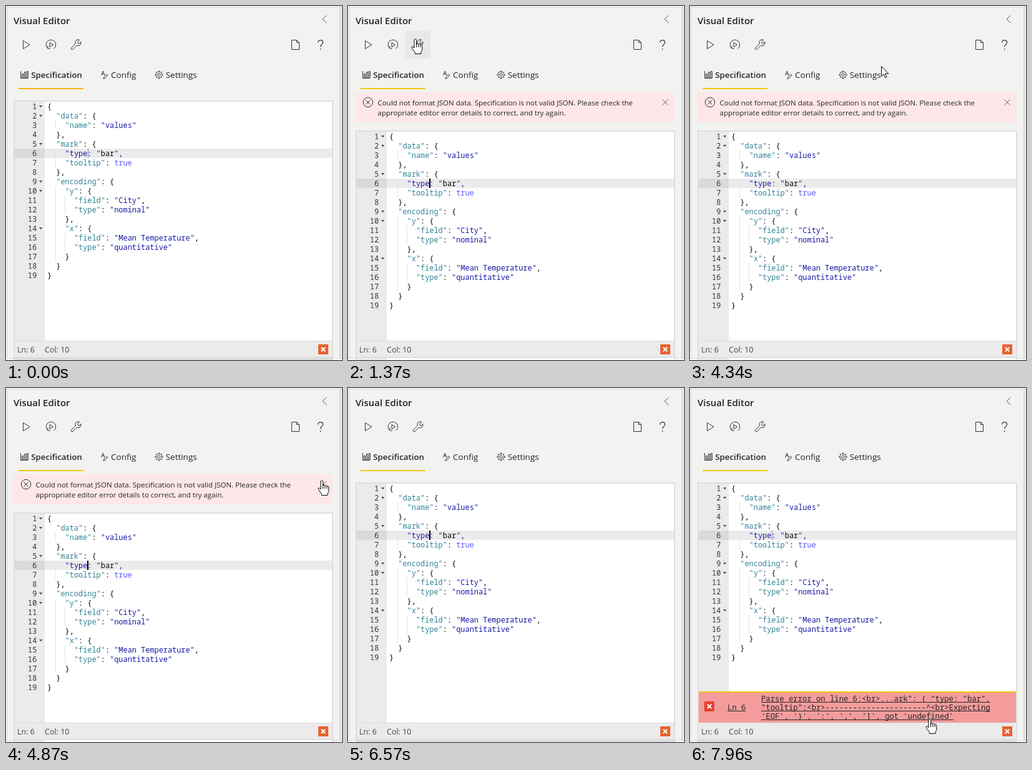
Write an HTML page that moves like this. It is 538x566 px and loops after 8000 ms.

```html
<!DOCTYPE html>
<html lang="en">
<head>
<meta charset="utf-8">
<title>Visual Editor</title>
<style>
html, body { margin: 0; width: 100%; height: 100%; overflow: hidden; background: #fff; }
svg { display: block; }
text { white-space: pre; font-family: "Open Sans", "Noto Sans", sans-serif; fill: #252423; }
.code { font-family: "Noto Sans Mono", "DejaVu Sans Mono", monospace; font-size: 11.917px; fill: #080808; }
.num { fill: #333; text-anchor: end; }
.key { fill: #318495; }
.str { fill: #1a1aa6; }
.bool { fill: #585cf6; }
.log { font-size: 12.22px; fill: #252423; }
.icon { fill: none; stroke: #333; stroke-width: 1; }
.tab { font-size: 13.5px; }
.note { font-size: 11.53px; }
.status { font-size: 12.5px; fill: #444; }
.cursor { fill: #fff; stroke: #000; stroke-linejoin: round; }
</style>
</head>
<body>
<svg id="stage" width="538" height="566" viewBox="0 0 538 566"></svg>
<script>
const source = `{
  "data": {
    "name": "values"
  },
  "mark": {
    "type: "bar",
    "tooltip": true
  },
  "encoding": {
    "y": {
      "field": "City",
      "type": "nominal"
    },
    "x": {
      "field": "Mean Temperature",
      "type": "quantitative"
    }
  }
}`.split("\n");
const log = [
  'Parse error on line 6:<br>...ark": { "type: "bar",',
  '"tooltip":<br>' + "-".repeat(22) + "^<br>Expecting",
  "'EOF', '}', ':', ',', ']', got 'undefined'"
];
const CHAR = 7.15, LEFT = 66;

const escape = s => s.replace(/&/g, "&amp;").replace(/</g, "&lt;");
const rect = (x, y, w, h, fill, more = "") =>
  `<rect x="${x}" y="${y}" width="${w}" height="${h}" fill="${fill}" ${more}/>`;
const text = (x, y, cls, s, more = "") =>
  `<text x="${x}" y="${y}" class="${cls}" ${more}>${s}</text>`;
const icon = (d, more = "") => `<path class="icon" d="${d}" ${more}/>`;
const cross = (x, y, r, more) =>
  icon(`M${x - r} ${y - r}l${2 * r} ${2 * r}m0 ${-2 * r}l${-2 * r} ${2 * r}`, more);
const circle = (x, y, r) => `<circle class="icon" cx="${x}" cy="${y}" r="${r}"/>`;
const group = (id, body) => `<g id="${id}">${body}</g>`;
const errorMark = (x, y, fill) =>
  rect(x, y, 16, 16, fill) + cross(x + 8, y + 8, 3.2, 'style="stroke:#fff;stroke-width:2"');

const highlight = line => line.replace(/"[^"]*(?:"|$)(:?)|true/g, (m, colon = "") => {
  const word = colon ? m.slice(0, -1) : m;
  const cls = m === "true" ? "bool" : colon ? "key" : "str";
  return `<tspan class="${cls}">${word}</tspan>${colon}`;
});

function codeLine(line, i) {
  const y = 153 + 15 * i, depth = line.search(/\S/) / 2;
  let out = text(49.3, y + 11.8, "code num", i + 1);
  if (line.endsWith("{")) out += `<path d="M53 ${y + 6}h5.4l-2.7 3.4z" fill="#555"/>`;
  for (let k = 1; k < depth; k++)
    out += rect(Math.round(LEFT + k * 2 * CHAR) - 1, y, 1, 15, "#e2e2e2");
  return out + text(LEFT + depth * 2 * CHAR, y + 11.8, "code", highlight(line.trim()));
}

const gearTeeth = Array.from({ length: 8 }, (_, i) => {
  const c = Math.cos(i * Math.PI / 4), s = Math.sin(i * Math.PI / 4);
  return `M${245 + 5 * c} ${110 + 5 * s}L${245 + 7 * c} ${110 + 7 * s}`;
}).join("");

const wrench = "M104.8 66.8L111.3 60.3Q109.8 55.5 114 54Q116 53.3 117.8 54.2L114.6 57.4" +
  "L115.3 59.6 117.5 60.2 119.8 57.2Q120.8 60.5 118.3 62.8Q116 64.5 113.5 63.2" +
  "L107.2 69.3Q105.7 70.2 104.6 69.1T104.8 66.8Z";

const toolbar =
  text(12, 29, "", "Visual Editor", 'font-size="15" font-weight="600"') +
  icon("M513.3 15L507 21 513.3 27", 'style="stroke:#555"') +
  icon("M27.5 55.5V68.5L38 62Z") +
  icon("M66.5 67.5A7.8 7.8 0 1 1 76.5 68.3M66.8 63.8V68H71M70 58.5V65.5L75.5 62Z") +
  icon(wrench) +
  icon("M457.5 54.5H465.5L469.5 58.5V69.5H457.5ZM465.5 54.5V58.5H469.5") +
  icon("M499.7 58.5Q499.7 54.6 503.6 54.6T507.5 58.2Q507.5 60.3 505.5 61.8T503.6 65.2M503.6 68V70", 'style="stroke-width:1.2"') +
  icon("M23.5 104V115.5H35.5M25.5 115V108.5H27.5V115M29.5 115V105.5H31.5V115M33.5 115V104.5H35.5V115") +
  text(40.3, 115, "", "Specification", 'font-size="13.25" font-weight="600"') +
  icon("M152.5 111L155.3 104 158 111M153.5 108.5H157M156 116.5L157 113.5 161.3 109 163 110.7 158.7 115.3Z") +
  text(168, 115, "tab", "Config") +
  circle(245, 110, 5) + circle(245, 110, 2.2) + icon(gearTeeth) +
  text(255.7, 115, "tab", "Settings") +
  rect(20, 131, 104, 2, "#f2c811", 'id="underline"');

const banner =
  rect(12, 138, 511, 48, "#fde7e9") + circle(32, 154, 7.7) + cross(32, 154, 3.3) +
  text(47.6, 159, "note", "Could not format JSON data. Specification is not valid JSON. Please check the") +
  text(47.6, 175, "note", "appropriate editor error details to correct, and try again.") +
  cross(508, 154, 4.7, 'style="stroke:#666"');

const editor =
  rect(12, 151, 512, 420, "#dedede") + rect(14, 153, 48, 400, "#ebebeb") +
  rect(62, 153, 460, 400, "#fff") +
  rect(14, 228, 48, 15, "#dadada") + rect(62, 228, 460, 15, "#ebebeb") +
  source.map(codeLine).join("") +
  rect(130, 228, 2, 15, "#000", 'id="caret"') + rect(131, 228, 1, 15, "#8585d0", 'id="idleCaret"');

const errorRow =
  rect(14, 485, 508, 2, "#f2c811") + rect(14, 487, 508, 48, "#f49c9c") +
  errorMark(23, 501, "#e8402f") + text(60, 515, "code log", "Ln 6") +
  log.map((s, i) => text(114, 501 + 14 * i, "code log", escape(s))).join("") +
  group("links", rect(60, 516, 29, 1, "#252423") +
    log.map((s, i) => rect(114, 502 + 14 * i, s.length * 7.332, 1, "#252423")).join(""));

const hand = "M-2 14V1.5Q-2 0 -.3 0T1.5 1.5V8.5Q1.8 7 3.2 7T4.8 8.8Q5 7.7 6.4 7.7T8 9.5" +
  "Q8.3 8.8 9.5 9T10.8 11V16.5Q10.8 19 9 20.5V23.5H-.5V21.5L-5.5 14.5Q-6.5 12.8 -5.3 12T-3 13Z" +
  "M1.5 8V13M4.8 9V13M8 9.5V13";

document.getElementById("stage").innerHTML =
  rect(0, 0, 538, 566, "#fff") + rect(1, 1, 537, 563, "#d6d6d6") +
  rect(2, 2, 532, 561, "#f2f2f0") + rect(536, 2, 2, 561, "#f2f2f0") +
  rect(92, 40, 40, 44, "#e8e8e7", 'id="hover"') + toolbar +
  group("banner", banner) + group("editor", editor) +
  rect(12, 535, 512, 28, "#dedede") + rect(14, 536, 508, 25, "#ebebeb") +
  text(18, 553.5, "status", "Ln: 6") + text(62, 553.5, "status", "Col: 10") +
  errorMark(500, 541, "#e8622d") + group("errorRow", errorRow) +
  group("mouse",
    `<path id="arrow" class="cursor" d="M.5 .5V16.5L4.2 13 6.6 18.6 9 17.6 6.6 12.2H11.8Z"/>
     <path id="hand" class="cursor" transform="translate(-1 -1)" d="${hand}"/>
     <path id="beam" d="M-3.5 -7.5H-1L0 -6.5 1 -7.5H3.5M0 -6.5V6.5M-3.5 7.5H-1L0 6.5 1 7.5H3.5" fill="none" stroke="#000"/>`);

const $ = id => document.getElementById(id);
const show = (id, on) => $(id).style.display = on ? "" : "none";
const between = (t, a, b) => t >= a && t < b;

// Pointer stops: time, x, y
const path = [
  [500, 98, -20], [760, 101, 20], [1040, 109, 54], [3970, 109, 54], [4250, 250, 82],
  [4560, 440, 128], [4740, 499, 147], [4870, 507, 149], [5120, 507, 149], [5200, 511, 154],
  [5530, 511, 154], [5610, 516, 156], [5611, 560, 200], [5830, 538, 290], [6200, 528, 420],
  [6480, 519, 545], [6570, 514, 568], [6699, 514, 568], [6700, 512, 553], [7530, 512, 553],
  [7700, 465, 545], [7840, 405, 533], [7960, 385, 530], [8000, 385, 530]
];
const caretOn = [[1250, 1960], [2390, 2980], [3360, 3970], [4390, 4940], [5350, 5970], [6390, 7060]];

function pointer(t) {
  const i = path.findIndex(p => p[0] > t);
  if (i < 1) return [-50, -50];
  const [t0, x0, y0] = path[i - 1], [t1, x1, y1] = path[i], k = (t - t0) / (t1 - t0);
  return [x0 + (x1 - x0) * k, y0 + (y1 - y0) * k];
}

function draw(now) {
  const t = now % 8000, [x, y] = pointer(t);
  const shifted = between(t, 1250, 5350);
  const onWrench = between(x, 92, 132) && between(y, 40, 84);
  const onClose = shifted && x > 495;
  const onError = t >= 7530 && y < 535;
  const pointing = onWrench || onClose || onError;
  const typing = !pointing && between(t, 5350, 5612);

  $("mouse").setAttribute("transform", `translate(${Math.round(x)} ${Math.round(y)})`);
  show("hand", pointing);
  show("beam", typing);
  show("arrow", !pointing && !typing);
  show("hover", onWrench && t >= 1190);
  show("banner", shifted);
  $("banner").style.opacity = Math.min(1, 0.4 + (t - 1250) / 200);
  $("editor").setAttribute("transform", `translate(0 ${shifted ? 48 : 0})`);
  $("underline").setAttribute("fill", t < 1190 ? "#f2b411" : "#f2c811");
  show("caret", caretOn.some(([a, b]) => between(t, a, b)));
  show("idleCaret", t < 1250 || t >= 7060);
  show("errorRow", t >= 7060);
  show("links", onError);
}

const start = performance.now();
function frame() {
  draw(performance.now() - start);
  requestAnimationFrame(frame);
}
frame();
</script>
</body>
</html>
```
